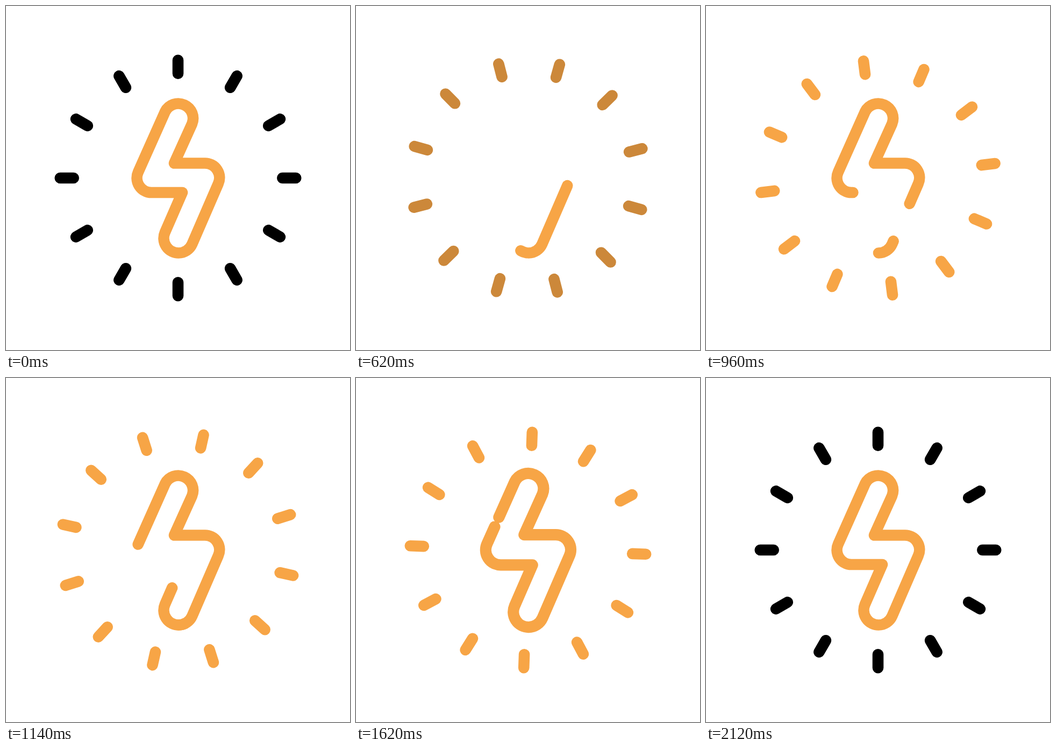
These frames come from a looping animation (640 by 640 pixels, 3.02 s). An HTML page:

```html
<!DOCTYPE html>
<html lang="en">
<head>
<meta charset="utf-8">
<title>Energy</title>
<style>
  html, body { margin: 0; height: 100%; overflow: hidden; background: #fff; }
  svg { display: block; width: 100vw; height: 100vh; }
  path { fill: none; stroke-width: 20.6; stroke-linecap: round; stroke-linejoin: round; }
  #bolt { stroke: #f7a546; }
</style>
</head>
<body>
<svg viewBox="0 0 640 640">
  <path id="rays"/>
  <g id="bolt">
    <path id="leaving" pathLength="1"/>
    <path id="arriving" pathLength="1"/>
  </g>
</svg>
<script>
const LOOP = 3020, STEP = 20;
const ORANGE = [247, 165, 70];
const BOLT = 'M321 459.5A27.5 27.5 0 0 1 295.8 421L328 347H270.5A27 27 0 0 1 246 308.8' +
  'L296 196.6A27.5 27.5 0 0 1 346 219.4L313 292.5H370A27 27 0 0 1 394.8 330.7' +
  'L346.2 443A27.5 27.5 0 0 1 321 459.5Z';

const [rays, bolt, leaving, arriving] =
  ['rays', 'bolt', 'leaving', 'arriving'].map(id => document.getElementById(id));
leaving.setAttribute('d', BOLT);
arriving.setAttribute('d', BOLT);

const polar = (r, a) => `${320 + r * Math.cos(a)} ${320 + r * Math.sin(a)}`;
rays.setAttribute('d', Array.from({ length: 12 }, (_, i) => {
  const a = i * Math.PI / 6;
  return `M${polar(194.3, a)}L${polar(219.3, a)}`;
}).join(''));

const span = (t, from, to) => Math.min(1, Math.max(0, (t - from) / (to - from)));
const smooth = s => s * s * (3 - 2 * s);

// Cubic Bezier easing with flat ends: handles at (x1, 0) and (x2, 1)
function ease(x, x1, x2) {
  if (x <= 0 || x >= 1) return x;
  let lo = 0, hi = 1;
  for (let i = 0; i < 30; i++) {
    const s = (lo + hi) / 2, q = 1 - s;
    if (3 * q * q * s * x1 + 3 * q * s * s * x2 + s * s * s < x) lo = s;
    else hi = s;
  }
  return smooth(lo);
}

function dash(path, start, length, gap) {
  path.style.display = length > 0 ? '' : 'none';
  path.setAttribute('stroke-dasharray', `${length} ${gap}`);
  path.setAttribute('stroke-dashoffset', -start);
}

function draw(t) {
  const turn = -90 * ease(span(t, 0, 2083), .65, .04);
  const glow = smooth(span(t, 400, 700)) - smooth(span(t, 1833, 2117));
  rays.setAttribute('transform', `rotate(${turn} 320 320)`);
  rays.setAttribute('stroke', `rgb(${ORANGE.map(c => Math.round(c * glow))})`);

  const gone = ease(span(t, 0, 1433), .333, 0);
  const drawn = ease(span(t, 533, 1967), .333, 0);
  dash(leaving, gone, t < 2120 ? 1 - gone : 0, 1);
  dash(arriving, .3833 * drawn, drawn, 1 - drawn);

  const pulse = smooth(span(t, 1500, 1833)) - smooth(span(t, 1833, 2110));
  bolt.setAttribute('transform',
    `translate(320 320) scale(${1 + .098 * pulse}) translate(-320 -320)`);
}

function tick() {
  const t = performance.now() % LOOP;
  draw(Math.floor(t / STEP) * STEP);
  requestAnimationFrame(tick);
}
tick();
</script>
</body>
</html>
```
